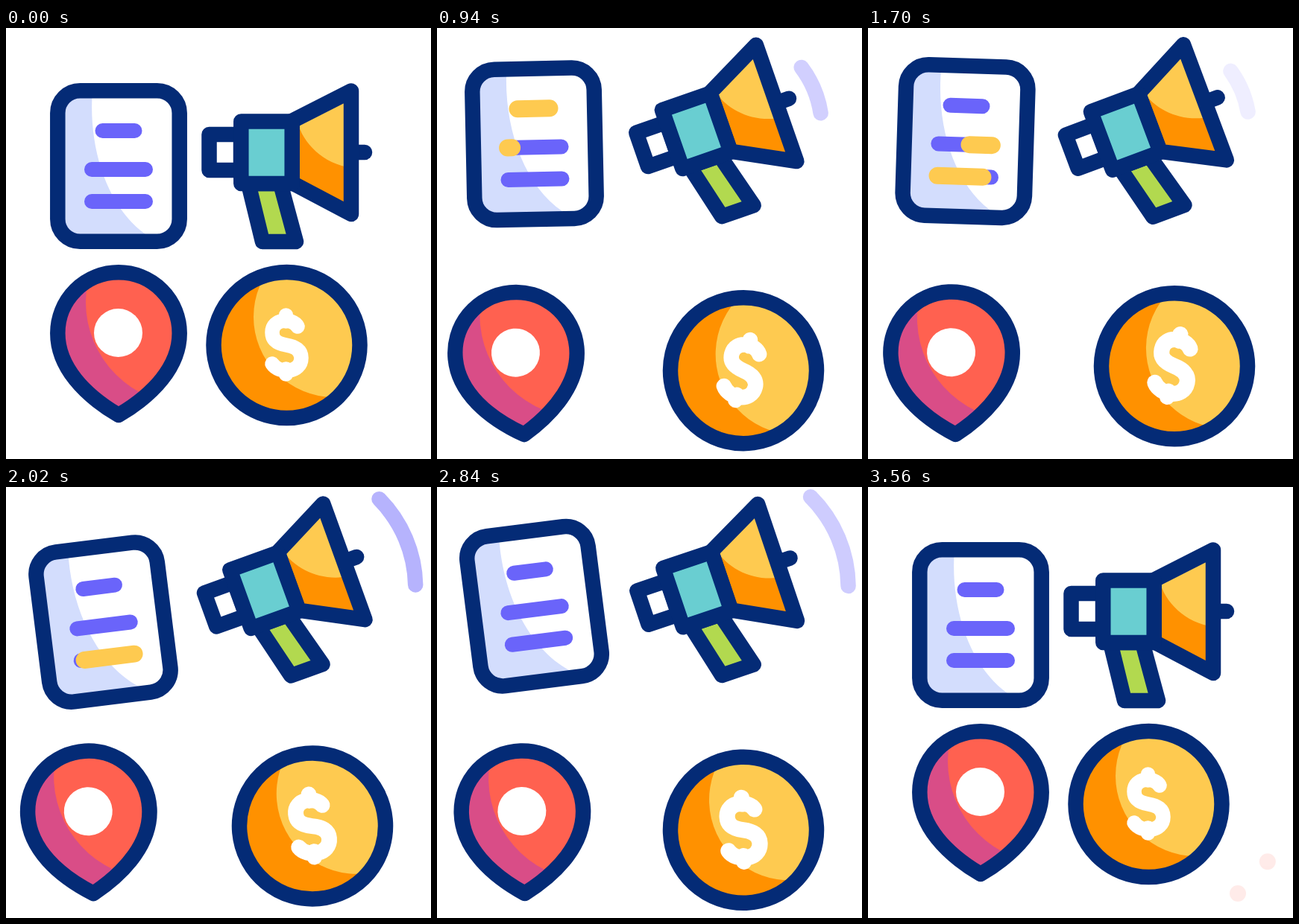
An HTML page that plays this animation: 570x579 px, repeating every 3.6 s.

```html
<!DOCTYPE html>
<html lang="en">
<head>
<meta charset="utf-8">
<title>Marketing icons</title>
<style>
  html, body { margin: 0; height: 100%; overflow: hidden; background: #fff; }
  svg { display: block; width: 570px; height: 579px; }
  .outline { fill: none; stroke: #042b76; stroke-width: 20.5; stroke-linejoin: round; stroke-linecap: round; }
  .bar { stroke: #6a64fa; stroke-width: 20; stroke-linecap: round; }
  .mark { stroke: #feca50; stroke-width: 23; }
  .dollar { fill: none; stroke: #fff; stroke-width: 19.5; stroke-linecap: round; stroke-linejoin: round; }
</style>
</head>
<body>
<svg viewBox="0 0 570 579">
  <defs>
    <rect id="sheet" x="69.3" y="84.3" width="163.4" height="202.5" rx="30"/>
    <path id="drop" d="M69.3 410A81.7 81.7 0 0 1 232.7 410C232.7 455 197 493 151 520C105 493 69.3 455 69.3 410Z"/>
    <circle id="disc" cx="376.5" cy="426" r="98"/>
    <path id="bell" d="M383.5 125L463 84.5V250L383.5 208Z"/>
    <clipPath id="inSheet"><use href="#sheet"/></clipPath>
    <clipPath id="inDrop"><use href="#drop"/></clipPath>
    <clipPath id="inDisc"><use href="#disc"/></clipPath>
    <clipPath id="inBell"><use href="#bell"/></clipPath>
  </defs>

  <g id="doc">
    <use href="#sheet" fill="#fff"/>
    <path clip-path="url(#inSheet)" fill="#d3ddfd" d="M116 84C110 160 135 240 187 277L200 287H60V84Z"/>
    <use href="#sheet" class="outline"/>
    <g id="bars"></g>
  </g>

  <path id="sound" fill="none" stroke="#6a64fa" stroke-width="20.5" stroke-linecap="round"/>
  <g id="horn">
    <path class="outline" d="M463 167H481"/>
    <path class="outline" style="fill:#fff" d="M315 143H272.5V191H315Z"/>
    <path class="outline" style="fill:#b2d94f" d="M325 209H368L389 287H344Z"/>
    <use href="#bell" fill="#feca50"/>
    <path clip-path="url(#inBell)" fill="#ff9100" d="M391 126C398 155 426 183 464 188V255H380V126Z"/>
    <use href="#bell" class="outline"/>
    <path class="outline" style="fill:#69ced1" d="M315.3 125.5H383.7V209H315.3Z"/>
  </g>

  <g id="pin">
    <use href="#drop" fill="#d94d87"/>
    <circle clip-path="url(#inDrop)" cx="245" cy="368" r="138" fill="#ff6150"/>
    <use href="#drop" class="outline"/>
    <circle cx="150.5" cy="409.5" r="32.5" fill="#fff"/>
  </g>

  <g id="sparks" fill="#ff6150"><circle r="11"/><circle r="11"/></g>
  <g id="coin">
    <use href="#disc" fill="#ff9100"/>
    <circle clip-path="url(#inDisc)" cx="440" cy="388" r="108" fill="#feca50"/>
    <use href="#disc" class="outline"/>
    <path id="dollar" class="dollar" d="M391 401C384 389 357 390 357 409C357 420 365 424 376 426C388 428 396 433 396 443C396 464 366 465 357 451M375.5 386V394M375.5 458V465"/>
  </g>
</svg>
<script>
const LOOP = 3600, OUT = 60, BACK = 3060, HOME = 3400, BEAT = 400;
const $ = id => document.getElementById(id);
const clamp = u => Math.min(1, Math.max(0, u));
const ease = u => (u = clamp(u), u * u * (3 - 2 * u));
const set = (el, attrs) => { for (const k in attrs) el.setAttribute(k, attrs[k]); };

// Eased value through [time, value] keys
function track(keys) {
  return t => keys.reduce((v, [time, value], i) => {
    if (!i) return value;
    const [t0, v0] = keys[i - 1];
    return t > t0 ? v0 + (value - v0) * ease((t - t0) / (time - t0)) : v;
  }, 0);
}

// Leave home, sway between a and b on every beat, then return
function sway(start, rest, first, a, b, end) {
  const keys = [[OUT, 0], [start, rest]];
  for (let t = first, i = 0; t < 2800; t += BEAT, i++) keys.push([t, i % 2 ? b : a]);
  return track([...keys, [BACK, end], [HOME, 0]]);
}

const spread = track([[OUT, 0], [420, 1], [BACK, 1], [HOME, 0]]);
const docTilt = sway(300, 0, 725, 10, -10, 0);
const docLift = sway(420, -30, 820, -37, -4, -21);
const hornTilt = sway(400, -21, 670, -26, -17, -21);
const pinTilt = sway(280, 0, 665, 10.5, -10.5, 10.5);
const coinTilt = sway(200, 0, 570, -14, 14, -14);
const coinDrop = sway(360, 20, 665, 1, 44, 22);
const dollarGrow = sway(200, 0, 670, .22, 0, .22);

const bars = [[129.5, 172.5, 138], [115, 187, 190], [115, 187, 233]].map(([x1, x2, y], i) => {
  const line = cls => {
    const el = document.createElementNS('http://www.w3.org/2000/svg', 'line');
    set(el, { class: cls, x1, x2, y1: y, y2: y });
    return $('bars').appendChild(el);
  };
  line('bar');
  return { x1, width: x2 - x1, grow: 340 + i * 530, shrink: 1000 + i * 480, mark: line('bar mark') };
});

const place = (el, dx, dy, angle, cx, cy) =>
  set(el, { transform: `translate(${dx} ${dy}) rotate(${angle} ${cx} ${cy})` });

function drawMarks(t) {
  for (const { x1, width, grow, shrink, mark } of bars) {
    const head = ease((t - grow) / 400), tail = ease((t - shrink) / 400);
    set(mark, {
      x1: x1 + width * tail, x2: x1 + width * head,
      visibility: head > 0 && tail < 1 ? 'visible' : 'hidden'
    });
  }
}

function drawSound(age) {
  const radius = 129 + .118 * age, half = 12.5 + .027 * age;
  const point = deg => {
    const a = deg * Math.PI / 180;
    return `${380 + radius * Math.cos(a)} ${135 + radius * Math.sin(a)}`;
  };
  set($('sound'), {
    d: `M${point(-22.9 - half)}A${radius} ${radius} 0 0 1 ${point(-22.9 + half)}`,
    opacity: clamp(Math.min(age / 200, (400 - age) / 120))
  });
}

function drawSparks(age, p) {
  const u = age / 300, reach = 1 - (1 - clamp(u)) ** 2;
  const [a, b] = $('sparks').children;
  const at = (el, dx, dy) => set(el, { cx: 376 + 22 * p + dx * reach, cy: 426 + 22 * p + dy * reach });
  at(a, 160.5, 77.5);
  at(b, 120.5, 120.5);
  set($('sparks'), { opacity: u < 0 ? 0 : clamp((1 - u) * 2) });
}

function frame(now) {
  const t = now % LOOP, p = spread(t);
  const age = t < 880 ? -1 : (t - 880) % (2 * BEAT);
  place($('doc'), -20.5 * p, docLift(t), docTilt(t), 150.8, 185.5);
  place($('horn'), 37.5 * p, -41.5 * p, hornTilt(t), 367, 289);
  place($('pin'), -33 * p, 26 * p, pinTilt(t), 151, 531);
  place($('coin'), 34.5 * p, coinDrop(t), coinTilt(t), 376.5, 426);
  set($('dollar'), { transform: `translate(376 426) scale(${1 + dollarGrow(t)}) translate(-376 -426)` });
  drawMarks(t);
  drawSound(t < BACK ? age : -1);
  drawSparks(age, p);
  requestAnimationFrame(() => frame(performance.now()));
}
frame(0);
</script>
</body>
</html>
```
